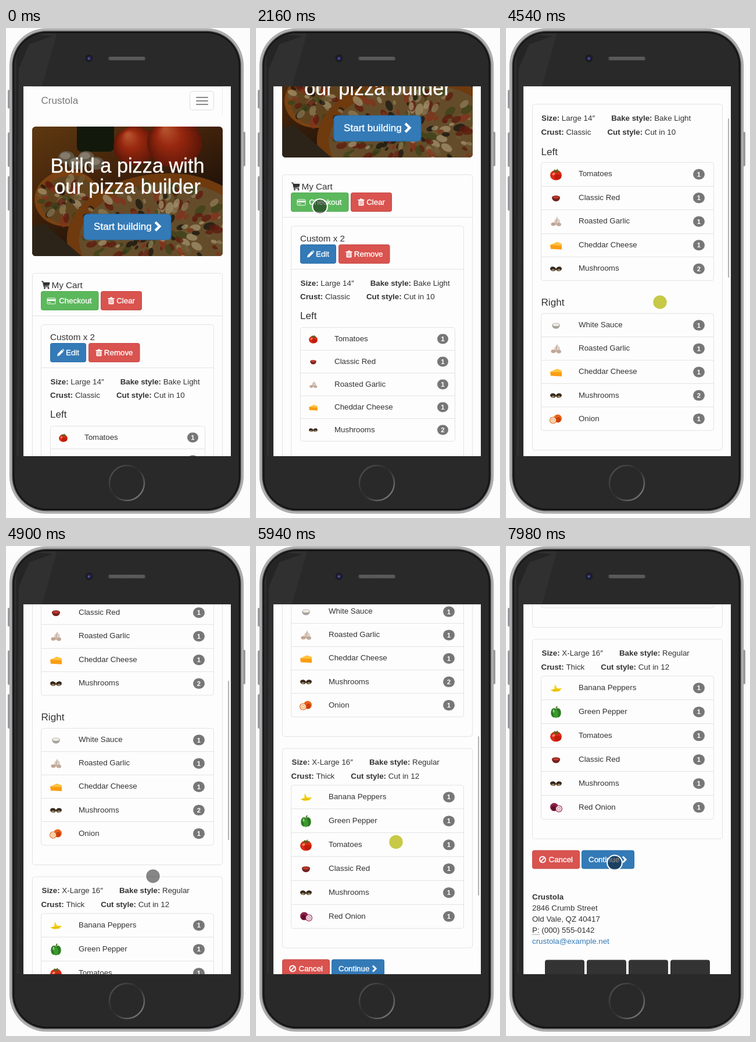
Recreate the animation shown at these times as an HTML page with a canvas. Size 420 by 840 pixels, loop 8000 ms.

```html
<!DOCTYPE html>
<html lang="en">
<head>
<meta charset="utf-8">
<title>Pizza checkout</title>
<style>
html, body { margin: 0; width: 100%; height: 100%; overflow: hidden; background: #fcfcfc; }
canvas { display: block; width: 420px; height: 840px; }
</style>
</head>
<body>
<canvas id="stage"></canvas>
<script>
const LOOP = 8000, W = 420, H = 840;
const VIEW = { x: 30, y: 100, w: 357, h: 634 };
const canvas = document.getElementById('stage');
const dpr = window.devicePixelRatio || 1;
canvas.width = W * dpr;
canvas.height = H * dpr;
const c = canvas.getContext('2d');
const SANS = '"Liberation Sans", Arial, sans-serif';
const INK = '#333', LINE = '#e3e3e3', BLUE = '#337ab7', RED = '#d9534f', GREEN = '#5cb85c';
// type sizes of the page at its zoom
const BODY = 13.33, LEAD = 15.23, HEAD = 17.1, TITLE = 34.3;

/* ---------- drawing helpers ---------- */
function box(x, y, w, h, r, fill, stroke) {
  c.beginPath();
  c.roundRect(x, y, w, h, r);
  if (fill) { c.fillStyle = fill; c.fill(); }
  if (stroke) { c.strokeStyle = stroke; c.lineWidth = 1; c.stroke(); }
}
function oval(x, y, rx, ry, fill, turn = 0) {
  c.beginPath();
  c.ellipse(x, y, rx, ry, turn, 0, 7);
  c.fillStyle = fill;
  c.fill();
}
function ring(x, y, r, color, width) {
  c.beginPath();
  c.arc(x, y, r, 0, 7);
  c.strokeStyle = color;
  c.lineWidth = width;
  c.stroke();
}
function poly(fill, ...p) {
  c.beginPath();
  for (let i = 0; i < p.length; i += 2) c.lineTo(p[i], p[i + 1]);
  c.closePath();
  c.fillStyle = fill;
  c.fill();
}
function line(color, width, ...p) {
  c.beginPath();
  for (let i = 0; i < p.length; i += 2) c.lineTo(p[i], p[i + 1]);
  c.strokeStyle = color;
  c.lineWidth = width;
  c.stroke();
}
// y is the middle of the capitals; returns the advance width
function text(s, x, y, size = BODY, color = INK, bold = false, align = 'left') {
  const base = Math.round(y + size * 0.36 - 0.6);
  c.font = (bold ? 'bold ' : '') + size + 'px ' + SANS;
  c.textAlign = align;
  c.fillStyle = color;
  c.fillText(s, x, base);
  if (color === '#fff' && !bold) {
    c.strokeStyle = color;
    c.lineWidth = 0.35;
    c.strokeText(s, x, base);
  }
  return c.measureText(s).width;
}
function at(x, y, k, draw) {
  c.save();
  c.translate(x, y);
  c.scale(k, k);
  draw();
  c.restore();
}
function noise(i) {
  const v = Math.sin(i * 91.7 + 4) * 4375.5;
  return v - Math.floor(v);
}
function clipBox(x, y, w, h, r, draw) {
  c.save();
  c.beginPath();
  c.roundRect(x, y, w, h, r);
  c.clip();
  draw();
  c.restore();
}

/* ---------- glyphs ---------- */
const glyph = {
  card() {
    box(-7, -4.5, 14, 10, 1.5, null, '#fff');
    box(-7, -2.5, 14, 3, 0, '#fff');
    box(-5, 2.5, 4, 1, 0, '#fff');
  },
  trash() {
    box(-5.5, -4.5, 11, 2, 0.5, '#fff');
    box(-2, -6, 4, 2, 0.5, '#fff');
    box(-4.5, -2, 9, 8, 1, '#fff');
    for (const x of [-2, 0, 2]) line(RED, 0.8, x, -1, x, 4.5);
  },
  pencil() {
    poly('#fff', -6, 6, -5, 2, 2, -5, 5, -2, -2, 5);
    poly('#fff', 2.8, -5.8, 4, -6.5, 6.3, -4, 5.7, -2.8);
  },
  ban() {
    ring(0, 0, 5, '#fff', 2);
    line('#fff', 2, -3.4, 3.4, 3.4, -3.4);
  },
  chevron() { line('#fff', 3, -3, -5, 2, 0, -3, 5); },
  cart() {
    line(INK, 1.5, -7, -6, -4.5, -6, -2.5, 3, 6, 3);
    poly(INK, -4, -4.5, 7.5, -4.5, 6.5, 1, -2.8, 2);
    oval(-1.5, 5.5, 1.4, 1.4, INK);
    oval(5, 5.5, 1.4, 1.4, INK);
  }
};
function button(x, y, w, h, color, icon, label) {
  box(x, y, w, h, 4, color);
  box(x + 0.5, y + 0.5, w - 1, h - 1, 4, null, 'rgba(0,0,0,.08)');
  const last = icon === 'chevron';
  at(last ? x + w - 17 : x + 18, y + h / 2, 1, glyph[icon]);
  text(label, last ? x + 12 : x + w - 12, y + h / 2 + 0.3, BODY, '#fff', false, last ? 'left' : 'right');
}

/* ---------- food ---------- */
function bowl(rim, sauce, base) {
  c.beginPath();
  c.ellipse(0, -1, 7, 6.5, 0, 0, Math.PI);
  c.fillStyle = base;
  c.fill();
  oval(0, -1.5, 7, 3, rim);
  oval(0, -1.3, 5.5, 2, sauce);
}
// side puts the cut half on the left (-1) or right (1)
function onion(skin, dark, cut, side) {
  oval(-3 * side, -1, 7, 7, skin);
  oval(-4 * side, 1, 4, 4.5, dark);
  oval(5 * side, 2, 6, 6, skin);
  oval(5 * side, 2, 4.9, 5, cut);
  ring(5 * side, 2, 2.5, skin, 0.5);
}
const food = {
  'Tomatoes'() {
    oval(0, 1, 10, 8.8, '#dc2a14');
    oval(3, 4, 6, 4.5, '#c01c0c');
    oval(-4, -1, 2.6, 1.8, '#ff8a70', -0.5);
    for (let a = 0; a < 6; a += 1.26) oval(1 + 3 * Math.cos(a), -6 + 1.6 * Math.sin(a), 2.2, 1, '#3f6a1e', a);
  },
  'Classic Red'() { bowl('#7d2320', '#c23a2c', '#74211f'); },
  'White Sauce'() { bowl('#c4c2ba', '#efeee6', '#a3a198'); },
  'Roasted Garlic'() {
    oval(2, 0, 5, 5.5, '#ddcfc4');
    poly('#d3c0b2', 0, -4, 2, -9, 4, -4);
    oval(-4.5, 4, 4, 3, '#c5a48f');
    oval(5, 4.5, 4, 3, '#bda99c');
    line('#a98e80', 0.8, 1, -4, 0, 5);
  },
  'Cheddar Cheese'() {
    poly('#ffc23c', -10, -1, 2, -6, 10, -3, 10, 0);
    poly('#fb9d10', -10, -1, 10, 0, 10, 7, -9, 6);
  },
  'Mushrooms'() {
    for (const side of [-1, 1]) {
      oval(5 * side, -0.3, 5, 3.8, '#35271b', -0.2 * side);
      oval(5 * side, 1.6, 2.8, 1.7, '#a08560');
    }
  },
  'Onion'() { onion('#e8641c', '#c8400f', '#f8e3c4', -1); },
  'Red Onion'() { onion('#8e1f48', '#64102f', '#f3dfe8', 1); },
  'Banana Peppers'() {
    poly('#f4cf1c', -10, 3, -3, 1, -2, -7, 2, 0, 10, 0, 6, 5, -3, 6);
    line('#c9a80c', 0.9, -6, 3.5, 5, 3);
  },
  'Green Pepper'() {
    for (const side of [-1, 1]) oval(3.5 * side, 1, 5.2, 8, '#2a7c20');
    oval(0, 3, 4, 7, '#3c9a2c');
    oval(-4, -2, 1.5, 3, '#8fce7c');
    line('#4f7a2a', 2.2, 0, -6, 2, -10);
  }
};

// names may carry a count, as in 'Mushrooms*2'; big is the wider list
function list(x, y, w, h, items, big) {
  const rowH = h / items.length;
  box(x + 0.5, y + 0.5, w - 1, h, 4, null, LINE);
  items.forEach((item, i) => {
    const [name, count = '1'] = item.split('*');
    const top = y + i * rowH, mid = top + rowH / 2;
    const bx = x + w - (big ? 26 : 21.5), bw = big ? 20 : 19;
    if (i) line(LINE, 1, x, Math.round(top) + 0.5, x + w, Math.round(top) + 0.5);
    at(x + (big ? 26 : 22.5), mid + 1, big ? 1 : 0.74, food[name]);
    text(name, x + (big ? 65 : 59), mid);
    box(bx - bw / 2, mid - bw / 2 + 1.5, bw, bw - 2, 9.5, '#777');
    text(count, bx, mid + 1, 11.4, '#fff', true, 'center');
  });
}
function facts(x, y, ...parts) {
  for (let i = 0; i < parts.length; i += 2) {
    x += text(parts[i] + ':', x, y, BODY, INK, true);
    x += text(' ' + parts[i + 1], x, y) + 28;
  }
}
const SHARED = ['Roasted Garlic', 'Cheddar Cheese', 'Mushrooms*2'];
const LEFT = ['Tomatoes', 'Classic Red', ...SHARED];
const RIGHT = ['White Sauce', ...SHARED, 'Onion'];
const WHOLE = ['Banana Peppers', 'Green Pepper', 'Tomatoes', 'Classic Red', 'Mushrooms', 'Red Onion'];

/* ---------- pages ---------- */
function nav() {
  line('#ececec', 1, 45, 100.5, 372.5, 100.5, 372.5, 150);
  text('Crustola', 60.5, 124.5, HEAD, '#777');
  box(316.5, 108.5, 41, 32, 4, null, '#ddd');
  for (let y = 118; y < 132; y += 6) box(327, y, 21, 2, 1, '#888');
}
function pie(x, y, rx, ry, crust, cheese, count) {
  const tones = ['#5c1a0e', '#8d7a55', '#17150f', '#3b4218', '#84301a', '#6a5430', '#a08f6a'];
  oval(x, y, rx, ry, crust, -0.12);
  oval(x + 5, y + 3, rx * 0.9, ry * 0.87, cheese, -0.12);
  c.globalAlpha = 0.75;
  for (let i = 0; i < count; i++) {
    const a = noise(i) * 6.28, d = 0.84 * Math.sqrt(noise(i + 300)), r = 3 + noise(i + 600) * 8;
    oval(x + Math.cos(a) * d * rx, y + Math.sin(a) * d * ry, r, r * 0.6, tones[i % tones.length], a);
  }
  c.globalAlpha = 1;
}
function photo() {
  const wood = c.createLinearGradient(45, 169, 150, 391);
  wood.addColorStop(0, '#5e3810');
  wood.addColorStop(0.5, '#44240b');
  wood.addColorStop(1, '#1d1009');
  c.fillStyle = wood;
  c.fillRect(45, 169, 328, 222);
  box(122, 150, 64, 62, 8, '#12180b');
  for (const [x, y, r] of [[222, 202, 37], [290, 197, 47]]) {
    const skin = c.createRadialGradient(x - r / 3, y - r / 2, 3, x, y, r);
    skin.addColorStop(0, '#b4502c');
    skin.addColorStop(0.4, '#98280f');
    skin.addColorStop(1, '#5a1608');
    oval(x, y, r, r * 0.9, skin);
  }
  for (let i = 0; i < 4; i++) {
    oval(104 + i * 17, 222 + (i % 2) * 10, 14, 11, '#5f5544');
    oval(102 + i * 17, 219 + (i % 2) * 10, 9, 6, '#85796a');
  }
  pie(105, 292, 56, 48, '#7a4212', '#5f431f', 50);
  pie(262, 350, 158, 100, '#6e3a0e', '#644c2a', 200);
  poly('#2c2419', 45, 340, 66, 336, 130, 391, 45, 391);
}
function home() {
  nav();
  clipBox(45, 169, 328, 222, 5.7, photo);
  text('Build a pizza with', 209, 236, TITLE, '#fff', false, 'center');
  text('our pizza builder', 209, 272.5, TITLE, '#fff', false, 'center');
  box(134, 319, 150, 44, 5.7, BLUE, '#2e6da4');
  text('Start building', 151, 340.5, HEAD, '#fff');
  at(261.5, 340, 1.45, glyph.chevron);

  box(45.5, 420.5, 327, 3200, 4, null, LINE);
  line(LINE, 1, 45, 493.5, 373, 493.5);
  at(68, 440.5, 1, glyph.cart);
  text('My Cart', 78.5, 441, LEAD);
  button(60, 451, 99.5, 33, GREEN, 'card', 'Checkout');
  button(163, 451, 71, 33, RED, 'trash', 'Clear');

  box(60.5, 508.5, 297, 900, 4, null, LINE);
  line(LINE, 1, 60, 582.5, 358, 582.5);
  text('Custom x 2', 76, 530, LEAD);
  button(76, 540, 62, 33, BLUE, 'pencil', 'Edit');
  button(142, 540, 88.5, 33, RED, 'trash', 'Remove');
  facts(76.5, 606.5, 'Size', 'Large 14″', 'Bake style', 'Bake Light');
  facts(76, 629.5, 'Crust', 'Classic', 'Cut style', 'Cut in 10');
  text('Left', 76, 662.5, HEAD);
  list(76, 682, 267, 195, LEFT);
  text('Right', 76, 914.5, HEAD);
  list(76, 934, 267, 195, RIGHT);
}
function checkout() {
  nav();
  text('Checkout', 209.5, 206.5, TITLE, INK, false, 'center');
  box(45.5, 253.5, 327, 593, 4, null, LINE);
  facts(61, 277.5, 'Size', 'Large 14″', 'Bake style', 'Bake Light');
  facts(60.5, 301.5, 'Crust', 'Classic', 'Cut style', 'Cut in 10');
  text('Left', 60.5, 335, HEAD);
  list(60, 353, 298, 202.5, LEFT, true);
  text('Right', 60.5, 593.5, HEAD);
  list(60, 612, 298, 200.5, RIGHT, true);

  box(45.5, 867, 327, 342, 4, null, LINE);
  facts(61.5, 891, 'Size', 'X-Large 16″', 'Bake style', 'Regular');
  facts(60.5, 915, 'Crust', 'Thick', 'Cut style', 'Cut in 12');
  list(60, 929.5, 298, 245.5, WHOLE, true);

  button(45, 1228.5, 82, 32, RED, 'ban', 'Cancel');
  button(130, 1228.5, 91, 32, BLUE, 'chevron', 'Continue');
  const address = ['Crustola', '2846 Crumb Street', 'Old Vale, QZ 40417', 'P: (000) 555-0142', 'crustola@example.net'];
  address.forEach((s, i) => text(s, 45, 1308.5 + i * 19, BODY, i === 4 ? BLUE : INK, i === 0));
  c.setLineDash([1, 1]);
  line('#555', 1, 45, 1373, 58, 1373);
  c.setLineDash([]);
  for (let i = 0; i < 4; i++) box(67 + i * 72, 1416.5, 68, 44, 4, '#333');
}

/* ---------- phone ---------- */
function gloss() {
  poly('#303030', 14, 8, 88, 8, 62, 100, 30, 100, 22, 734, 14, 734);
  poly('#252525', 18, 8, 80, 14, 40, 28, 22, 70, 18, 734, 14, 734);
}
function phone() {
  box(3, 106, 5, 32, 2, '#98999b');
  box(3, 179, 5, 59, 2, '#98999b');
  box(3, 254, 5, 59, 2, '#98999b');
  box(407, 178, 5, 59, 2, '#98999b');
  ['#a2a3a5', '#b4b5b7', '#a9aaac', '#6a6a6a', '#151515'].forEach((tone, i) => {
    const d = i * 1.35;
    box(6 + d, 0.5 + d, 403 - 2 * d, 832 - 2 * d, 64 - d, tone);
  });
  box(14.5, 9, 386, 815, 55, '#292929');
  clipBox(14.5, 9, 386, 815, 55, gloss);

  oval(143, 52, 6.5, 6.5, '#1b1b24');
  oval(143, 52, 3.2, 3.2, '#2c2c5c');
  oval(142.5, 52.5, 1.4, 1.4, '#5c5cae');
  box(176, 49, 64, 6.5, 3.2, '#4a4a4a');
  for (let i = 0; i < 120; i++) box(178 + i / 2, 50 + (i % 3) * 1.7, 1, 1, 0, '#747474');

  const shine = c.createLinearGradient(186, 758, 230, 802);
  shine.addColorStop(0, '#4c4c4c');
  shine.addColorStop(0.42, '#2c2c2c');
  shine.addColorStop(0.55, '#343434');
  shine.addColorStop(1, '#757575');
  ring(208, 780, 30, shine, 2.5);
}

/* ---------- motion ---------- */
const smooth = u => u * u * (3 - 2 * u);
const glide = u => 1 - (1 - u) ** 3;
const HOLD = 40, SWITCH = 2820;

// Each gesture changes the state s by its progress u
const move = (x, y) => (s, u) => { s.x += (x - s.x) * smooth(u); s.y += (y - s.y) * smooth(u); };
const drag = d => (s, u) => {
  s.scroll += d * smooth(u);
  s.y -= d * smooth(u);
  s.down = s.down || u < 1;
};
const fling = d => (s, u) => { s.scroll += d * glide(u); };
const tap = (s, u) => { s.down = s.down || u < 1; };
const reset = s => { s.scroll = 0; };

const gestures = [
  [440, 800, move(294, 619)],
  [860, 1250, drag(163)],
  [1250, 1300, fling(6)],
  [1530, 1800, move(235, 245)],
  [1800, 2160, move(110, 306)],
  [2520, 2560, tap],
  [2560, 2680, move(284, 330)],
  [SWITCH, SWITCH, reset],
  [3080, 3280, move(261, 514)],
  [3280, 3380, move(265, 593)],
  [3400, 3880, drag(115)],
  [4200, 4360, drag(8)],
  [4540, 4690, drag(72)],
  [4690, 4900, fling(104.5)],
  [4690, 4900, move(253, 566)],
  [4960, 5270, drag(110)],
  [5270, 5560, fling(27.5)],
  [5310, 5560, move(241, 590.5)],
  [5740, 6100, drag(141.5)],
  [6100, 6670, fling(128)],
  [6980, 7710, move(187, 543)],
  [7980, 7980, tap]
];
function stateAt(t) {
  const s = { x: 405, y: 466, scroll: 0, down: false, bar: 0 };
  for (const [from, to, act] of gestures) {
    if (t < from - HOLD) break;
    const before = s.scroll;
    act(s, to > from ? Math.min(1, Math.max(0, (t - from) / (to - from))) : +(t >= from));
    // the bar stays a while after the page moved, then fades
    if (s.scroll > before) s.bar = Math.min(1, Math.max(0, (to + 600 - t) / 250));
    if (act === reset) s.bar = 0;
  }
  return s;
}

function scrollbar(s, total) {
  c.globalAlpha = s.bar;
  box(382, VIEW.y + 2 + s.scroll * VIEW.h / total, 2.2, VIEW.h * VIEW.h / total, 1, '#b5b5b5');
  c.globalAlpha = 1;
}
function touch(s) {
  oval(s.x, s.y, 12, 12, s.down ? 'rgba(178,180,0,.72)' : 'rgba(0,0,0,.47)');
  ring(s.x, s.y, 12.8, '#fff', 2);
}
function render(t) {
  const s = stateAt(t), first = t < SWITCH;
  c.setTransform(dpr, 0, 0, dpr, 0, 0);
  c.fillStyle = '#fcfcfc';
  c.fillRect(0, 0, W, H);
  phone();
  clipBox(VIEW.x, VIEW.y, VIEW.w, VIEW.h, 0, () => {
    box(VIEW.x, VIEW.y, VIEW.w, VIEW.h, 0, '#fdfdfd');
    at(0, -Math.round(s.scroll), 1, first ? home : checkout);
    scrollbar(s, first ? 3900 : 1472);
  });
  if (t >= 440) touch(s);
}
const start = performance.now();
function tick() {
  render((performance.now() - start) % LOOP);
  requestAnimationFrame(tick);
}
tick();
</script>
</body>
</html>
```
